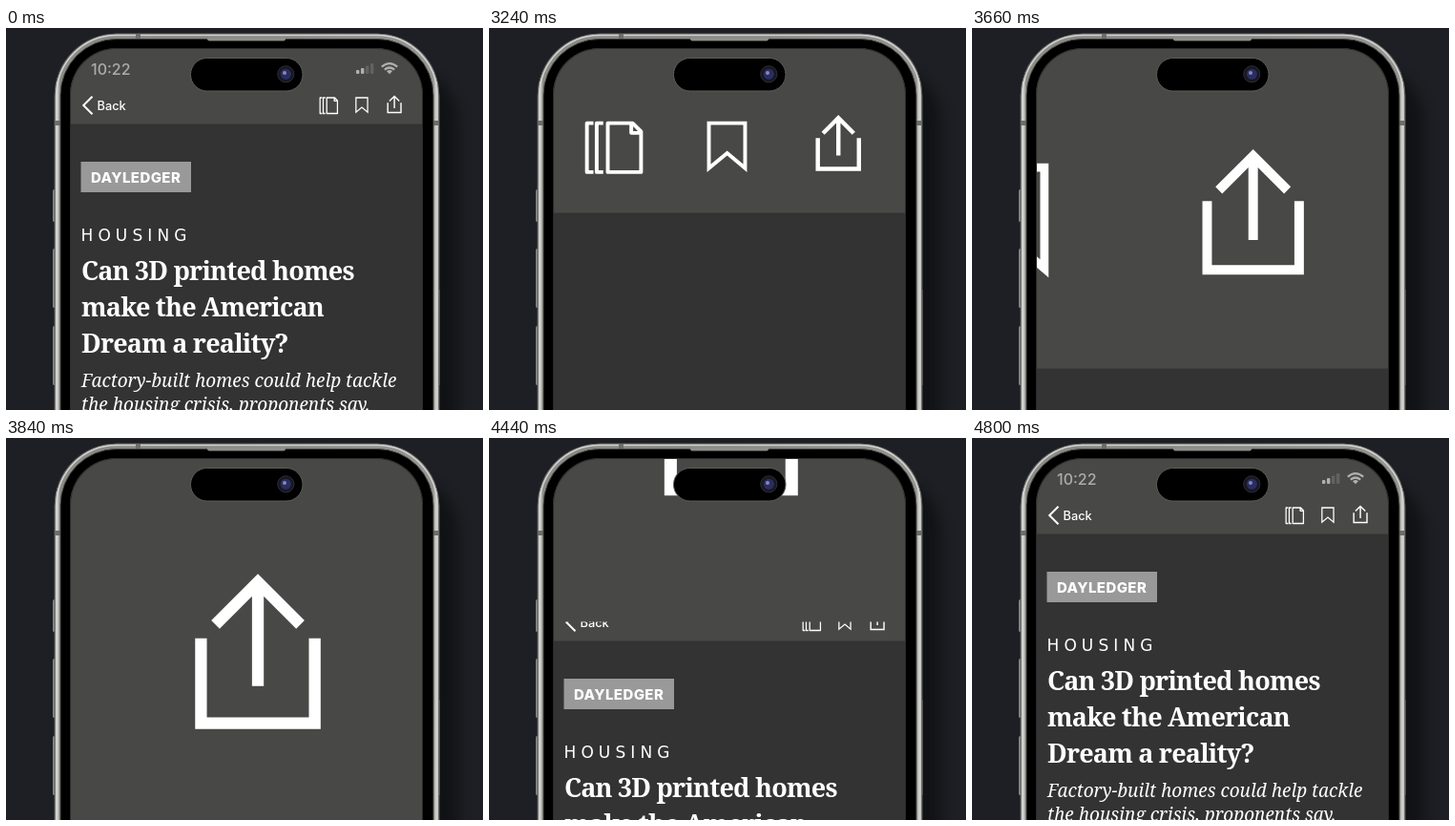
An HTML page for the animation above (5700 ms loop, 500x400 px).

```html
<!DOCTYPE html>
<html lang="en">
<head>
<meta charset="utf-8">
<title>Share from the article</title>
<style>
  html, body { margin: 0; width: 100%; height: 100%; overflow: hidden; background: #1d1f24; }
  svg { display: block; width: 100vw; height: 100vh; font-family: Inter, sans-serif; }
  text { fill: #fff; }
  .line { fill: none; stroke: #fff; }
  .title { font: 700 27px "Noto Serif", serif; letter-spacing: -.8px; }
  .deck { font: italic 500 19px "Noto Serif", serif; }
  /* toolbar icons are a little larger at rest than in the enlarged view */
  .icon { transform-box: fill-box; transform-origin: 50% 0; transform: scale(1.1); }
  .zooming .icon { transform: none; }
</style>
</head>
<body>
<svg viewBox="0 0 500 400">
  <defs>
    <linearGradient id="metal">
      <stop offset="0" stop-color="#8c8c89"/>
      <stop offset=".006" stop-color="#dcdcd8"/>
      <stop offset=".014" stop-color="#8c8c89"/>
      <stop offset=".5" stop-color="#858582"/>
      <stop offset=".985" stop-color="#969693"/>
      <stop offset=".993" stop-color="#d6d6d2"/>
      <stop offset="1" stop-color="#777774"/>
    </linearGradient>
    <filter id="soft"><feGaussianBlur stdDeviation="7"/></filter>
    <clipPath id="glass"><rect x="67" y="21" width="370" height="480" rx="49"/></clipPath>
    <path id="share" class="line" stroke-width="1.3"
      d="M400.8 77.6V87H413.4V77.6M407.1 82.9V71.6M402.4 76.1L407.1 71.4L411.8 76.1"/>
  </defs>

  <rect width="500" height="400" fill="#1d1f24"/>
  <rect x="80" y="40" width="394" height="480" rx="60" filter="url(#soft)" opacity=".4"/>

  <!-- phone body -->
  <g fill="#8a8a87">
    <rect x="49" y="169" width="4" height="34" rx="1.5"/>
    <rect x="49" y="231" width="4" height="62" rx="1.5"/>
    <rect x="49" y="312" width="4" height="62" rx="1.5"/>
    <rect x="453" y="274" width="2" height="100" fill="#4b4b4a"/>
  </g>
  <rect x="51" y="6" width="403" height="480" rx="65" fill="url(#metal)" stroke="#5a5a58"/>
  <rect x="53" y="7.5" width="399" height="480" rx="63" fill="none" stroke="#d4d4d0" stroke-width="1.4"/>
  <g fill="#6d6d6a">
    <rect x="51" y="97" width="7" height="5"/>
    <rect x="447" y="97" width="7" height="5"/>
    <rect x="136" y="6" width="5" height="6"/>
  </g>
  <rect x="57" y="11.5" width="391" height="480" rx="59" stroke="#4c4c4b"/>
  <rect x="211" y="9.5" width="82" height="4" rx="2" fill="#8f8f8c"/>

  <g clip-path="url(#glass)">
    <rect x="60" width="384" height="400" fill="#484846"/>
    <g id="page">
      <rect x="-40" y="100.5" width="540" height="500" fill="#333"/>
      <text x="89" y="49" font-size="16" font-weight="500" style="fill:#acacaa">10:22</text>
      <g fill="#b0b0ae">
        <rect x="367" y="44" width="3.4" height="4" rx="1"/>
        <rect x="372" y="42" width="3.4" height="6" rx="1"/>
        <g fill="#626260">
          <rect x="377" y="39.5" width="3.4" height="8.5" rx="1"/>
          <rect x="382" y="37" width="3.4" height="11" rx="1"/>
        </g>
        <path d="M402 48.3L399 45.2Q402 42.8 405 45.2Z"/>
      </g>
      <path class="line" style="stroke:#b0b0ae" stroke-width="2.2"
        d="M393.8 40.6Q402 33.6 410.2 40.6M396.8 43.6Q402 39.4 407.2 43.6"/>
      <path class="line" stroke-width="2" d="M90.5 71.8L81.2 81L90.5 90.2"/>
      <text x="95.5" y="86" font-size="12.8" font-weight="500">Back</text>
      <path class="line icon" stroke-width="1.15" stroke-linejoin="round"
        d="M332 73H330V88H332M335 73H333V88H335M336.4 73H344L346.6 75.6V88H336.4ZM343.6 73V76H346.6"/>
      <path class="line icon" stroke-width="1.15" d="M367.4 73H378.5V86.8L373 82.2L367.4 86.8Z"/>
      <use class="icon" href="#share"/>
      <rect x="78.5" y="140" width="115.5" height="32" fill="#999"/>
      <text x="89" y="161.5" font-size="15" font-weight="800" letter-spacing=".4">DAYLEDGER</text>
      <text x="78.5" y="222.5" font-size="17" letter-spacing="5.1" font-family="DejaVu Sans, sans-serif">HOUSING</text>
      <g class="title">
        <text x="79" y="264">Can 3D printed homes</text>
        <text x="79" y="302">make the American</text>
        <text x="79" y="340">Dream a reality?</text>
      </g>
      <g class="deck">
        <text x="79" y="376">Factory-built homes could help tackle</text>
        <text x="79" y="400.5">the housing crisis, proponents say.</text>
      </g>
      <rect id="cover" x="60" width="384" height="80.5" fill="#484846"/>
    </g>
    <use id="big" href="#share"/>
    <rect x="67" y="21" width="370" height="480" rx="49" fill="none" stroke="#2c2c2b" stroke-width="2"/>
  </g>

  <rect x="193.5" y="31.5" width="117.5" height="34.5" rx="17.2" stroke="#5d5d5b"/>
  <circle cx="293.3" cy="48.3" r="8.6" fill="#171820" stroke="#2b2c3a"/>
  <circle cx="293.3" cy="48.3" r="5.6" fill="#2b2d5e"/>
  <circle cx="292" cy="47" r="2" fill="#8587c2"/>
</svg>

<script>
const LOOP = 5700, STEP = 30, ZOOM = 9.07;
const [page, cover, big] = ["page", "cover", "big"].map(id => document.getElementById(id));
const part = (t, from, to) => Math.min(1, Math.max(0, (t - from) / (to - from)));
const zoom = s => `translate(424 62) scale(${s}) translate(-424 -62)`;

function draw(t) {
  const grow = part(t, 3000, 3900);
  const push = part(t, 4050, 4650);
  const pushing = t > 4050;
  // zoom into the share icon, then push it out with the page from below
  page.setAttribute("transform", pushing
    ? `translate(0 ${320 * (1 - push)})`
    : zoom(1 + ZOOM * grow));
  page.classList.toggle("zooming", grow > 0 && !pushing);
  cover.setAttribute("opacity", pushing ? 1 - part(t, 4650, 4800) : 0);
  big.setAttribute("transform", `translate(0 ${-400 * push}) ${zoom(1 + ZOOM)}`);
  big.setAttribute("visibility", pushing && push < 1 ? "visible" : "hidden");
}

const start = performance.now();
function tick() {
  const t = (performance.now() - start) % LOOP;
  draw(Math.floor(t / STEP) * STEP);
  requestAnimationFrame(tick);
}
tick();
</script>
</body>
</html>
```
